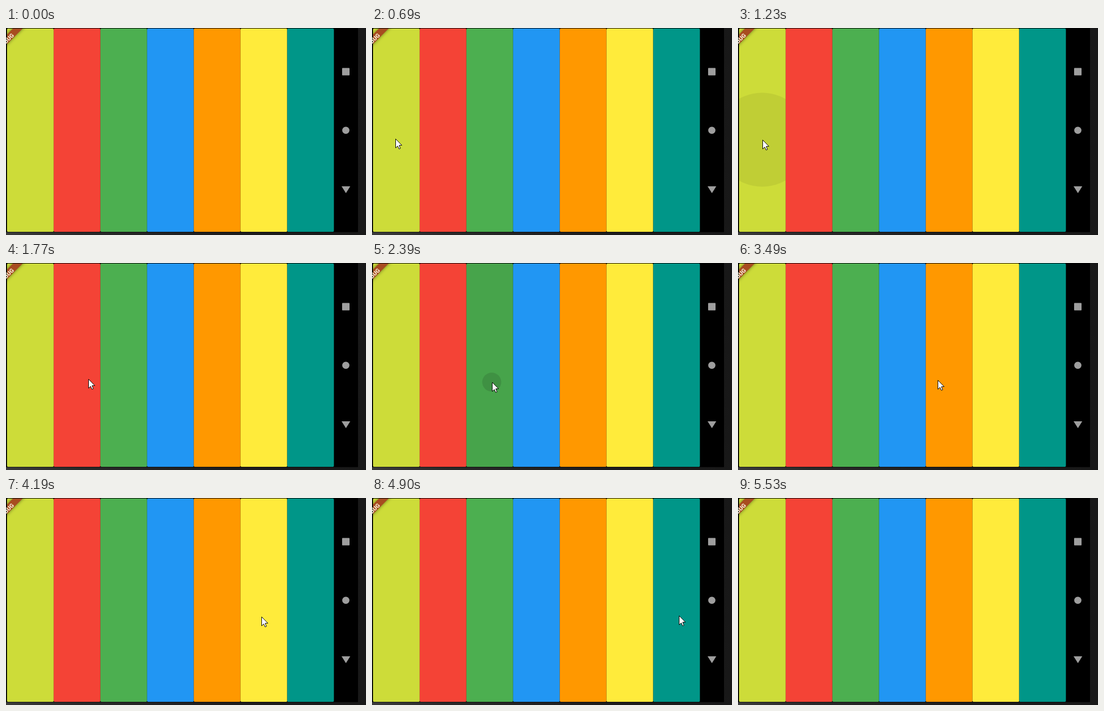
Animation, 678 px wide and 391 px high, one loop 6.23 s. Source, as an HTML page with a canvas:

```html
<!DOCTYPE html>
<html lang="en">
<head>
<meta charset="utf-8">
<title>Colour keys</title>
<style>
  html, body { margin: 0; width: 100%; height: 100%; overflow: hidden; background: #000; }
  canvas { display: block; }
</style>
</head>
<body>
<canvas id="stage" width="678" height="391"></canvas>
<script>
const ctx = document.getElementById('stage').getContext('2d');
const LOOP = 6230, STEP = 78, PHASE = 437;
const KEY_X = 1.9, KEY_W = 87.95, KEY_H = 384, FULL_RADIUS = 197;
const HOLD = 95, LINGER = 100, FADE = 150;
const ENTER = 437, LEAVE = 5500;

// Each key is tapped once, at a time and a point
const keys = [
  { color: '#cddc39', press: 1052, x: 46, y: 211 },
  { color: '#f44336', press: 1445, x: 122, y: 216 },
  { color: '#4caf50', press: 2296, x: 226, y: 225 },
  { color: '#2196f3', press: 2960, x: 316, y: 222 },
  { color: '#ff9800', press: 3810, x: 376, y: 221 },
  { color: '#ffeb3b', press: 4270, x: 481, y: 224 },
  { color: '#009688', press: 5150, x: 578, y: 222 },
];
const entry = { x: 191, y: 357 };

const clamp = v => Math.max(0, Math.min(1, v));
const easeInOut = v => v * v * (3 - 2 * v);
const easeOutBack = v => 1 + 2.7 * (v - 1) ** 3 + 1.7 * (v - 1) ** 2;
const mix = (a, b, k) => ({ x: a.x + (b.x - a.x) * k, y: a.y + (b.y - a.y) * k });
const shade = alpha => `rgba(0,0,0,${alpha})`;

// The screen refreshes in even steps
const screenTime = t => PHASE + Math.floor((t - PHASE) / STEP) * STEP;

// Rest on a key after its tap, then use half of the idle time to reach the next
function pointerAt(t) {
  if (t < ENTER || t > LEAVE) return null;
  const first = keys[0];
  if (t < first.press) {
    return mix(entry, first, easeOutBack((t - ENTER) / (first.press - ENTER)));
  }
  const from = keys.findLast(key => key.press <= t);
  const to = keys[keys.indexOf(from) + 1];
  if (!to) return from;
  const start = from.press + HOLD + LINGER;
  return mix(from, to, easeInOut(clamp((t - start) / (to.press - start) * 2)));
}

function fillShape(color, trace) {
  ctx.fillStyle = color;
  ctx.beginPath();
  trace();
  ctx.fill();
}

function polygon(points) {
  points.forEach(([x, y]) => ctx.lineTo(x, y));
  ctx.closePath();
}

function drawKey({ color, press, x, y }, i, t) {
  const left = KEY_X + i * KEY_W, release = press + HOLD;
  ctx.save();
  fillShape(color, () => ctx.roundRect(left, 1, KEY_W, KEY_H, 2));
  ctx.clip();

  const glow = clamp((t - press + 60) / 80) * clamp(1 - (t - release) / 60);
  ctx.fillStyle = shade(0.062 * glow);
  ctx.fillRect(left, 1, KEY_W, KEY_H);

  // The ripple creeps while held and spreads fast once released
  if (t > press) {
    const held = (Math.min(t, release) - press) / 1000 * FULL_RADIUS;
    const radius = Math.min(FULL_RADIUS, held + Math.max(0, t - release));
    const alpha = 0.115 * clamp(1 - (t - release) / FADE);
    fillShape(shade(alpha), () => ctx.arc(x - 0.5, y, radius, 0, 7));
  }
  ctx.restore();
}

function drawRibbon() {
  ctx.save();
  ctx.beginPath();
  ctx.rect(2, 1, 90, 90);
  ctx.clip();
  ctx.translate(11.6, 11.6);
  ctx.rotate(-Math.PI / 4);
  ctx.shadowColor = shade(0.5);
  ctx.shadowBlur = 6;
  ctx.fillStyle = '#a84c20';
  ctx.fillRect(-60, -6.4, 120, 12.8);
  ctx.restore();

  ctx.save();
  ctx.translate(13, 11.8);
  ctx.rotate(-Math.PI / 4);
  ctx.font = '900 11px Roboto, sans-serif';
  ctx.textAlign = 'right';
  ctx.fillStyle = '#f7ead2';
  ctx.fillText('DEBUG', 0, 4);
  ctx.restore();
}

function drawFrame() {
  const edge = ctx.createLinearGradient(0, 0, 678, 0);
  edge.addColorStop(0, '#3a3a3a');
  edge.addColorStop(0.2, '#292929');
  edge.addColorStop(0.6, '#1d1d1d');
  edge.addColorStop(1, '#181818');
  ctx.fillStyle = edge;
  ctx.fillRect(0, 0, 678, 391);
  ctx.fillStyle = '#000';
  ctx.fillRect(0, 0, 663, 385.5);
}

function drawNavigation() {
  const gray = '#9e9e9e';
  fillShape(gray, () => ctx.roundRect(633, 75.5, 14, 14, 1));
  fillShape(gray, () => ctx.arc(640, 193.3, 6.8, 0, 7));
  fillShape(gray, () => polygon([[632, 299], [648.4, 299], [640.2, 312]]));
}

function drawPointer({ x, y }) {
  ctx.save();
  ctx.translate(Math.round(x) + 0.5, Math.round(y) + 0.5);
  ctx.strokeStyle = '#000';
  fillShape('#fff', () => polygon([[0, 0], [0, 17], [3.9, 13.4], [6.4, 19],
                                   [9, 18], [6.6, 12.2], [11.7, 12]]));
  ctx.stroke();
  ctx.restore();
}

function draw(now) {
  const t = screenTime(now % LOOP);
  drawFrame();
  keys.forEach((key, i) => drawKey(key, i, t));
  drawRibbon();
  drawNavigation();
  const pointer = pointerAt(t);
  if (pointer) drawPointer(pointer);
  requestAnimationFrame(draw);
}

draw(0);
</script>
</body>
</html>
```
